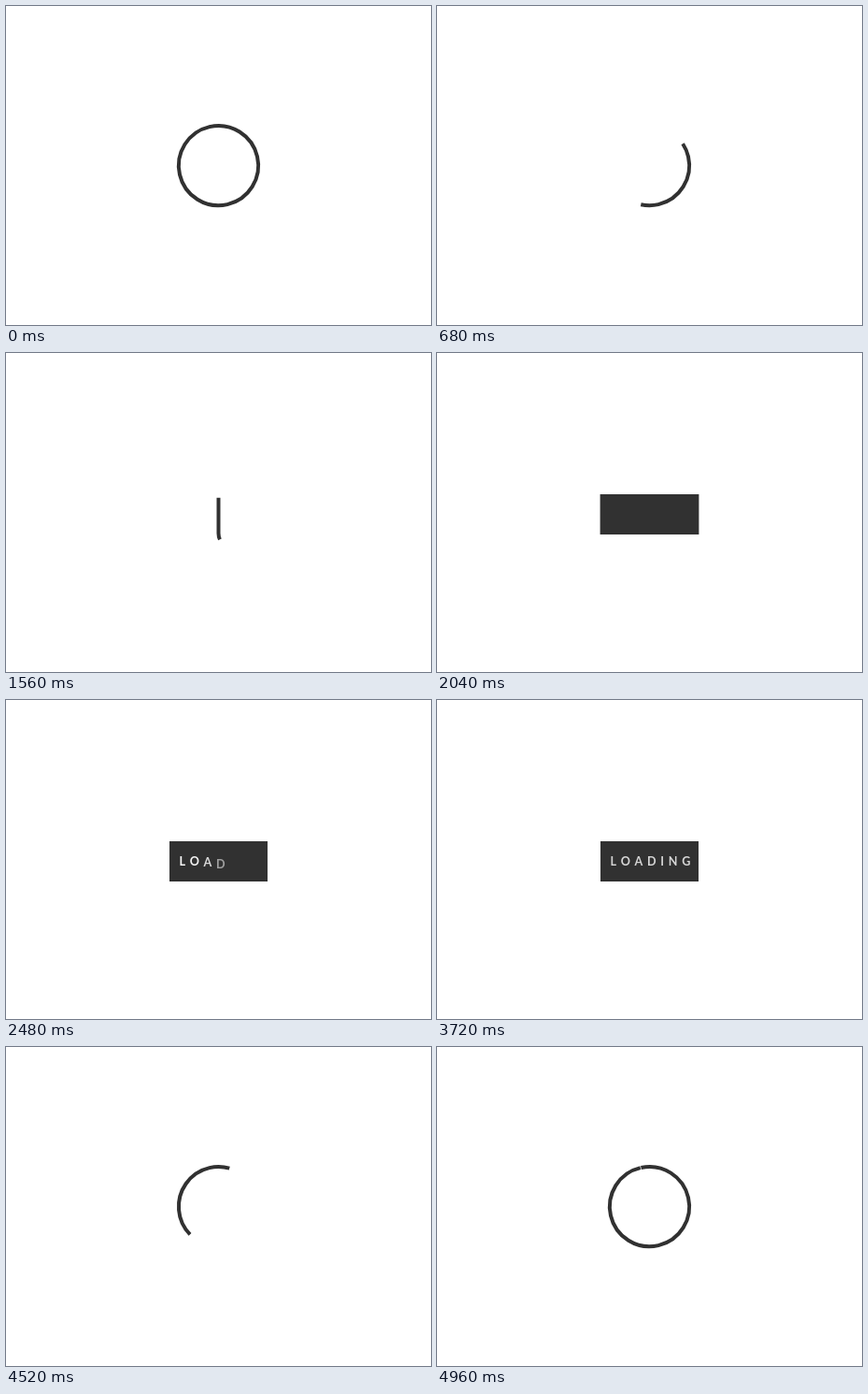
An HTML page with a canvas that plays this animation: 455 px wide and 341 px high, repeating every 5000 ms.

```html
<!DOCTYPE html>
<html>
<head>
<meta charset="utf-8">
<style>
  html, body { margin: 0; width: 100%; height: 100%; overflow: hidden; background: #fff; }
  canvas { display: block; }
</style>
</head>
<body>
<canvas id="stage" width="455" height="341"></canvas>
<script>
const ctx = document.getElementById('stage').getContext('2d');
const LOOP = 5000, STEP = 40, INK = '#313131';
const CX = 227.5, CY = 170.6, R = 42.6;   // ring
const r = 15.5;                           // bend between ring and bar
const TOP = 151, BOTTOM = 194, BAR = BOTTOM - TOP, WIDE = 105, LINE = 4;
const RAD = Math.PI / 180, DEG = R * RAD; // DEG: length of one degree of ring
const SEAM = -13;                         // where the ring closes, degrees from top

// The bend touches the ring from inside and the bar from the right.
const dy = Math.sqrt(R * R - 2 * R * r);
const tilt = Math.atan2(dy, r);
const joinIn = 90 + tilt / RAD, joinOut = 90 - tilt / RAD;
const bend = r * (Math.PI - tilt);

const inLength = (720 + joinIn - SEAM) * DEG + bend + CY + dy - TOP;
const outLength = BOTTOM - (CY - dy) + bend + (720 + SEAM - joinOut) * DEG;

const clamp = u => Math.min(1, Math.max(0, u));
const mix = (a, b, u) => a + (b - a) * u;

// Ease with flat ends; x1 and x2 are the handle positions.
function ease(t, start, end, x1 = 0.5, x2 = 0.5) {
  const u = clamp((t - start) / (end - start));
  let lo = 0, hi = 1;
  for (let i = 0; i < 24; i++) {
    const s = (lo + hi) / 2, q = 1 - s;
    if (3 * q * q * s * x1 + 3 * q * s * s * x2 + s * s * s < u) lo = s; else hi = s;
  }
  return lo * lo * (3 - 2 * lo);
}

function ring(from, to) {
  ctx.arc(CX, CY, R, (from - 90) * RAD, (to - 90) * RAD);
}

function strokePart(tail, head) {
  ctx.setLineDash([0, tail, head - tail, 9999]);
  ctx.stroke();
}

function ringToBar(t) {
  ctx.beginPath();
  ring(SEAM, SEAM + 360);
  ring(SEAM, SEAM + 360);
  ring(SEAM, joinIn);
  ctx.arc(CX + r, CY + dy, r, tilt, Math.PI);
  ctx.lineTo(CX, TOP);
  strokePart(
    mix(0, inLength - BAR, ease(t, 80, 1760, 0.38, 0.28)),
    mix(360.5 * DEG, inLength, ease(t, 80, 1760, 0.5, 0.3)));
}

function barToRing(t) {
  ctx.beginPath();
  ctx.moveTo(CX, BOTTOM);
  ctx.lineTo(CX, CY - dy);
  ctx.arc(CX + r, CY - dy, r, Math.PI, 2 * Math.PI - tilt);
  ring(joinOut, SEAM + 360);
  ring(SEAM, SEAM + 360);
  strokePart(
    mix(0, outLength - 360 * DEG, ease(t, 4050, 4820)),
    mix(BAR, outLength, ease(t, 4000, 5000)));
}

function label(t) {
  ctx.font = '700 12.6px Lato, sans-serif';
  ctx.fillStyle = '#fff';
  const fade = 1 - clamp((t - 3680) / 200);
  let x = 185.5;
  [...'LOADING'].forEach((letter, i) => {
    const rise = 1 - (1 - clamp((t - 2320 - i * 40) / 280)) ** 5;
    ctx.globalAlpha = rise * fade;
    ctx.fillText(letter, x, 176.8 + 7 * (1 - rise));
    x += ctx.measureText(letter).width + 4.7;
  });
}

function panel(t) {
  const over = WIDE + 2;
  const width = t < 2080 ? mix(LINE, over, ease(t, 1760, 2080, 0.4, 0.3))
    : t < 3720 ? mix(over, WIDE, ease(t, 2080, 2320))
    : mix(WIDE, LINE, ease(t, 3720, 4000));
  ctx.save();
  ctx.beginPath();
  ctx.rect(CX - width / 2, TOP, width, BAR);
  ctx.fill();
  ctx.clip();
  label(t);
  ctx.restore();
}

function draw(now) {
  const t = Math.floor(now % LOOP / STEP) * STEP;
  ctx.clearRect(0, 0, 455, 341);
  ctx.strokeStyle = ctx.fillStyle = INK;
  ctx.lineWidth = LINE;
  (t < 1760 ? ringToBar : t < 4000 ? panel : barToRing)(t);
}

let start;
function tick(now) {
  start ??= now;
  draw(now - start);
  requestAnimationFrame(tick);
}
draw(0);
requestAnimationFrame(tick);
</script>
</body>
</html>
```
